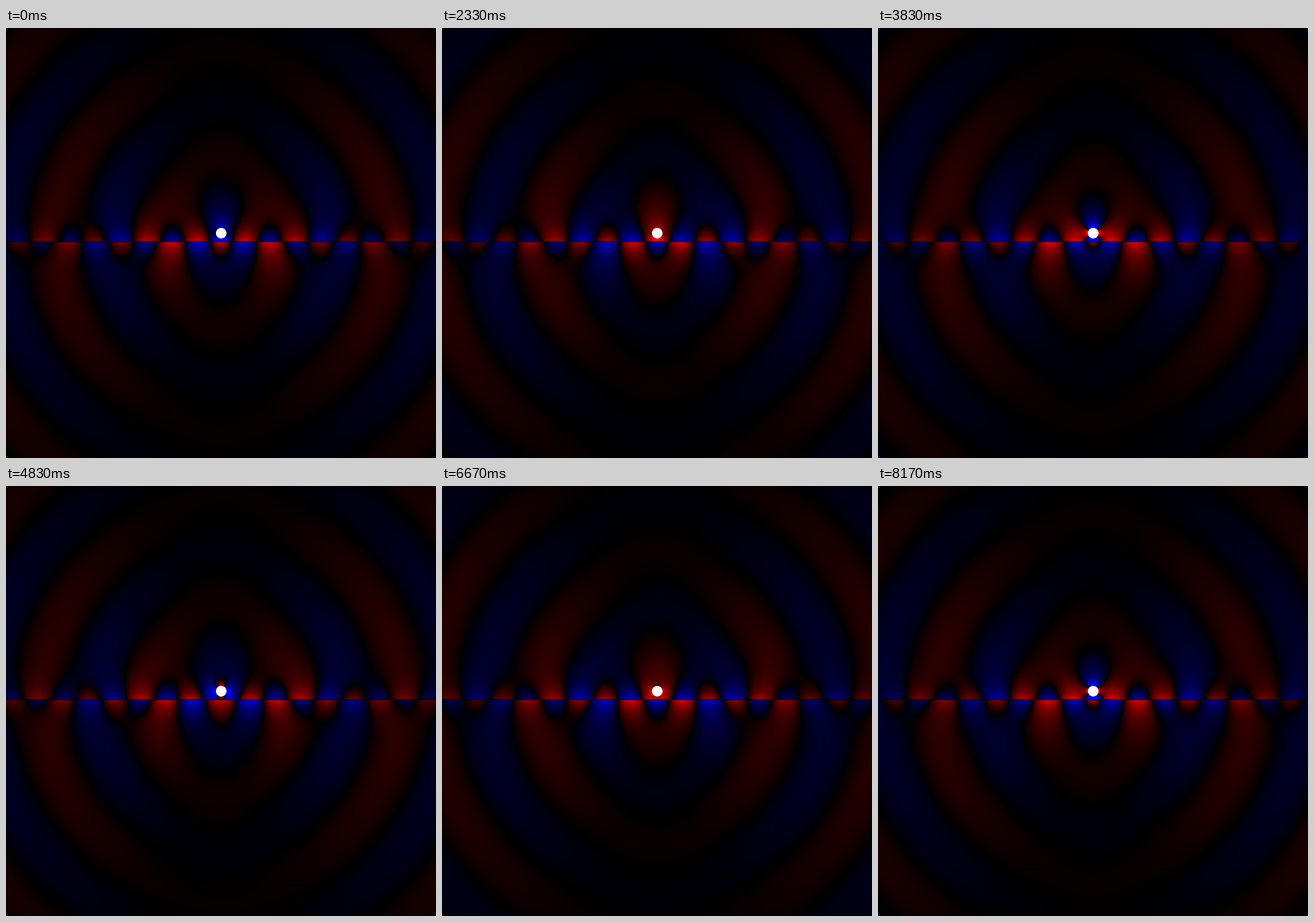
A matplotlib script for the animation above (8340 ms loop, 600x600 px).

```python
"""Line dipole radiating above a thin conducting sheet: E_z with its surface wave."""
import numpy as np
import matplotlib.pyplot as plt
from matplotlib.animation import FuncAnimation
from matplotlib.patches import Circle

SIZE = 600
FRAMES, LOOP_MS, CYCLES = 50, 8340, 2
CX, DIPOLE_Y, SHEET_Y = 300, 286.3, 298
K0 = 2 * np.pi / 148            # free-space wavenumber per pixel
Q = 2.064 + 0.125j              # surface-wave index, with loss
KAPPA = np.sqrt(Q**2 - 1)
PHASE = 1.37
GAIN, GAMMA = 0.33, 0.7         # field strength to brightness


def midpoints(end, step):
    return np.arange(step / 2, end, step)


def hankel(order, x):
    """Outgoing Hankel function of order 0 or 1, from its Laplace integral."""
    dw = 0.02
    w = midpoints(5, dw)
    norm = np.sqrt(np.pi) / (1 + order)
    kernel = (1 + 0.5j * w**2 / x[:, None])**(order - 0.5)
    integral = kernel @ (2 * dw * np.exp(-w**2) * w**(2 * order)) / norm
    phase = x - order * np.pi / 2 - np.pi / 4
    return np.sqrt(2 / (np.pi * x)) * np.exp(1j * phase) * integral


def direct(x, z):
    """Free-space E_z of a dipole pointing along z."""
    r = np.hypot(x, z)
    grid = np.arange(0.01, r.max() + 0.02, 0.01)
    h0, h1 = (np.interp(r, grid, hankel(n, grid)) for n in (0, 1))
    c2 = (z / r)**2
    return 0.5j * np.pi * ((1 - c2) * h0 + (2 * c2 - 1) * h1 / r)


def build_field():
    """Complex E_z on the pixel grid, from a sum over plane waves."""
    h = (SHEET_Y - DIPOLE_Y) * K0
    x = (np.arange(SIZE // 2) + 0.5) * K0
    z = (SHEET_Y - np.arange(SIZE) - 0.5) * K0
    above = z > 0

    du, ds = 0.0025, 0.0125
    u, v = midpoints(1, du), midpoints(24, ds)
    s = np.concatenate([-1j * u, v])            # decay constant normal to the sheet
    kx = np.sqrt(np.real(1 + s**2))
    weight = kx * np.concatenate([np.full(u.size, 1j * du), np.full(v.size, ds)])
    waves = np.cos(np.outer(kx, x))

    def spectrum(coef, depth):
        return np.exp(-np.outer(depth, s)) * (weight * coef) @ waves

    field = np.empty((SIZE, x.size), complex)
    field[above] = (direct(x[None, :], z[above, None] - h)
                    + spectrum(s / (s - KAPPA), z[above] + h))
    field[~above] = spectrum(-KAPPA / (s - KAPPA), h - z[~above])
    field[SHEET_Y - 1:SHEET_Y + 1] *= 0.2       # weak field inside the sheet
    return np.hstack([field[:, ::-1], field])


def shade(field, n):
    e = np.real(field * np.exp(-1j * (2 * np.pi * CYCLES * n / FRAMES + PHASE)))
    level = np.clip(GAIN * np.abs(e)**GAMMA, 0, 1)
    rgb = np.zeros(e.shape + (3,))
    rgb[..., 0] = np.where(e < 0, level, 0)
    rgb[..., 2] = np.where(e > 0, level, 0)
    return rgb


field = build_field()

fig = plt.figure(figsize=(6, 6), dpi=100, facecolor="black")
ax = fig.add_axes([0, 0, 1, 1])
ax.axis("off")
image = ax.imshow(shade(field, 0), extent=(0, SIZE, SIZE, 0), interpolation="nearest")
ax.add_patch(Circle((CX + 0.3, DIPOLE_Y), 7.4, color="white", lw=0))
ax.set_xlim(0, SIZE)
ax.set_ylim(SIZE, 0)


def update(n):
    image.set_data(shade(field, n))
    return (image,)


anim = FuncAnimation(fig, update, frames=FRAMES, interval=LOOP_MS / FRAMES,
                     repeat=True, repeat_delay=0)
plt.show()
```
